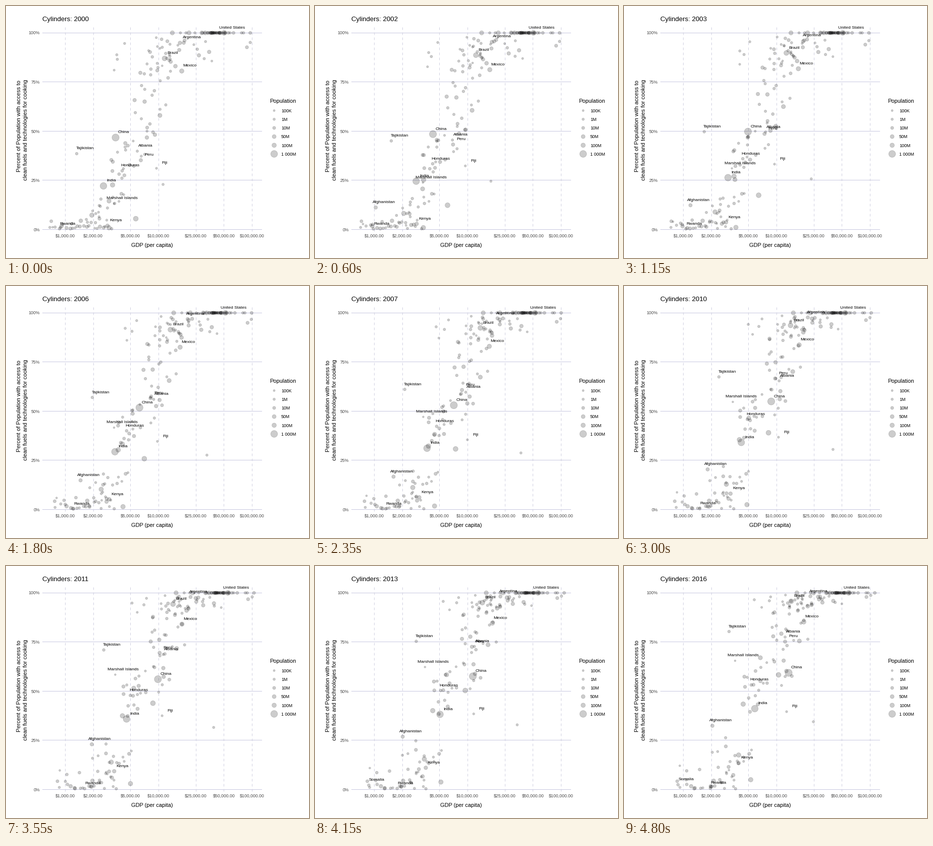
These frames come from a looping animation (600x500 px, 5 s). A matplotlib script:

```python
import numpy as np
import matplotlib.pyplot as plt
from matplotlib.animation import FuncAnimation

W, H, DPI = 600, 500, 100
PX = 72 / DPI                       # one pixel in points
STEP, FRAMES = 50, 100              # ms per frame, frames per loop
MID, LAST = 9, 16                   # key years, counted from 2000
TOP, BOTTOM = 53.3, 443.5           # 100% and 0%

plt.rcParams["font.family"] = "Liberation Sans"
fig = plt.figure(figsize=(W / DPI, H / DPI), dpi=DPI, facecolor="white")
ax = fig.add_axes([0, 0, 1, 1])
ax.set_xlim(0, W)
ax.set_ylim(H, 0)
ax.axis("off")


def write(x, y, s, size, color="black", **kw):
    kw.setdefault("va", "baseline")
    return ax.text(x, y, s, fontsize=size * PX, color=color, **kw)


def bubbles(xy, radii):
    xy = np.asarray(xy, float)
    size = (2 * np.asarray(radii) * PX) ** 2
    return ax.scatter(xy[:, 0], xy[:, 1], s=size, facecolors=(0, 0, 0, 0.2),
                      edgecolors=(0, 0, 0, 0.2), linewidths=0.7 * PX, zorder=3)


# ---- grid, axes and legend ----
for pct in range(0, 101, 25):
    y = BOTTOM - (BOTTOM - TOP) * pct / 100
    ax.plot([72, 506], [y - 0.5] * 2, color="#c8c8e0", lw=PX, zorder=1)
    write(67, y + 3.2, f"{pct}%", 8.8, "#4d4d4d", ha="right")

for gdp in (1000, 2000, 5000, 10000, 25000, 50000, 100000):
    x = 117 + 185 * np.log10(gdp / 1000)
    ax.plot([x, x], [447, 38], color="#cfcfe0", lw=PX, dashes=(5, 5), zorder=1)
    write(x, 459, f"\\${gdp:,}.00", 8.8, "#4d4d4d", ha="center")

write(289, 478, "GDP (per capita)", 11, ha="center")
for x, y, line in ((31.5, 238, "Percent of Population with access to"),
                   (44.5, 245.5, "clean fuels and technologies for cooking")):
    write(x, y, line, 11.3, rotation=90, ha="right", va="center")

write(522, 192, "Population", 11)
LEGEND = {"100K": 2.0, "1M": 2.4, "10M": 3.1, "50M": 3.9, "100M": 4.4, "1 000M": 6.8}
rows = 207.5 + 17.2 * np.arange(len(LEGEND))
bubbles([(531, y) for y in rows], list(LEGEND.values()))
for y, name in zip(rows, LEGEND):
    write(545, y + 3.2, name, 8.8)

title = write(72, 30, "", 13.2)

# ---- countries: a smooth curve through the places in 2000, 2009 and 2016 ----
countries = []


def country(name, radius, *places, since=0):
    curve = np.polyfit([0, MID, LAST], places, 2)
    label = write(0, 0, name, 8.5, ha="center", zorder=4)
    countries.append((label, radius, curve, since))
    return curve


states = country("United States", 5, (432, TOP), (437, TOP), (445, TOP))
country("Argentina", 3.4, (352, 73), (363, 63), (369, 60))
country("Brazil", 4.9, (314, 104), (329, 80), (331, 70))
country("Mexico", 4.4, (348, 129), (346, 118), (356, 111))
country("China", 7.1, (217, 261), (285, 232), (326, 212))
country("India", 6.7, (193, 357), (228, 315), (259, 283))
country("Tajikistan", 2.8, (140, 293), (184, 190), (208, 130))
country("Albania", 2.5, (260, 288), (304, 197), (319, 141))
country("Peru", 3.5, (267, 306), (296, 192), (319, 150))
country("Honduras", 2.9, (230, 327), (243, 270), (252, 236))
country("Marshall Islands", 1.8, (214, 392), (215, 241), (220, 188))
country("Kenya", 3.7, (201, 436), (209, 415), (227, 391))
country("Rwanda", 2.9, (106, 442), (146, 442), (171, 441))
country("Fiji", 2.2, (298, 322), (304, 302), (322, 289))
country("Afghanistan", 3.5, (103, 404), (162, 370), (175, 317), since=2)
country("Somalia", 2.9, (106, 436), (106, 436), (107, 434), since=13)

# large or far-off bubbles without a label
country("", 4.9, (257, 422), (283, 304), (306, 216))
country("", 4.5, (204, 440), (241, 435), (251, 424))
country("", 4.6, (211, 355), (227, 310), (236, 274))
country("", 4.5, (170, 415), (199, 396), (227, 375))
country("", 4.2, (204, 387), (243, 275), (270, 182))
country("", 2.4, (311, 354), (413, 327), (375, 309))

# ---- everyone else: seeded dots scattered along the rising band ----
rng = np.random.default_rng(7)


def spread(n, lo, hi):
    """Evenly filled range in shuffled order, slightly jittered."""
    return lo + (hi - lo) * (rng.permutation(n) + rng.uniform(0.1, 0.9, n)) / n


def cloud(n, a, b, width, dx, keep):
    """Dots around the line a-b; each ends dx further right, with
    the share `keep` of its distance to 100% left over."""
    s = spread(n, 0, 1)
    x = a[0] + (b[0] - a[0]) * s + spread(n, -width, width)
    gap = a[1] + (b[1] - a[1]) * s - TOP
    end = gap * np.minimum(keep * rng.uniform(0.85, 1.15, n), 1)
    return np.column_stack([x, TOP + gap, x + dx * rng.uniform(0.5, 1.5, n),
                            TOP + end, rng.triangular(1.8, 2.6, 4.2, n)])


paths = np.vstack([
    cloud(20, (148, 442), (144, 436), 62, 22, 1),
    cloud(7, (140, 434), (150, 424), 60, 22, 1),
    cloud(16, (170, 430), (218, 370), 22, 22, 0.94),
    cloud(22, (226, 345), (268, 240), 34, 30, 0.75),
    cloud(14, (272, 235), (302, 140), 36, 35, 0.6),
    cloud(32, (295, 138), (325, 62), 34, 36, 0.45),
    cloud(7, (385, 115), (395, 68), 25, 18, 0.4),
    cloud(4, (205, 135), (240, 66), 6, 58, 0.35),
    cloud(2, (472, 88), (492, 62), 1, 4, 0.3),
])

# the row at 100% moves along with the United States
row_x = np.concatenate([rng.normal(414, 13, 28), spread(15, 325, 490)])
row_r = rng.triangular(1.8, 2.8, 4.4, len(row_x))

radii = np.concatenate([[c[1] for c in countries], paths[:, 4], row_r])
dots = bubbles(np.zeros((len(radii), 2)), radii)


def draw(i):
    # five frames of rest, then one halfway to the next year
    year, part = divmod(i, 6)
    t = year + (0.5 if part == 5 else 0)
    title.set_text(f"Cylinders: {2000 + year}")

    named = []
    for label, _, curve, since in countries:
        x, y = np.polyval(curve, t)
        shown = t >= since
        label.set_position((x + 16, y - 8.5))
        label.set_visible(shown)
        named.append((x, y) if shown else (-50, -50))

    p = 1 - (1 - t / LAST) ** 1.2
    drift = paths[:, :2] * (1 - p) + paths[:, 2:4] * p
    shift = np.polyval(states, t)[0] - np.polyval(states, 0)[0]
    row = np.column_stack([row_x + shift, np.full(len(row_x), TOP)])
    dots.set_offsets(np.vstack([named, drift, row]))
    return [title, dots] + [c[0] for c in countries]


anim = FuncAnimation(fig, draw, frames=FRAMES, interval=STEP,
                     repeat=True, repeat_delay=0, blit=False)
plt.show()
```
